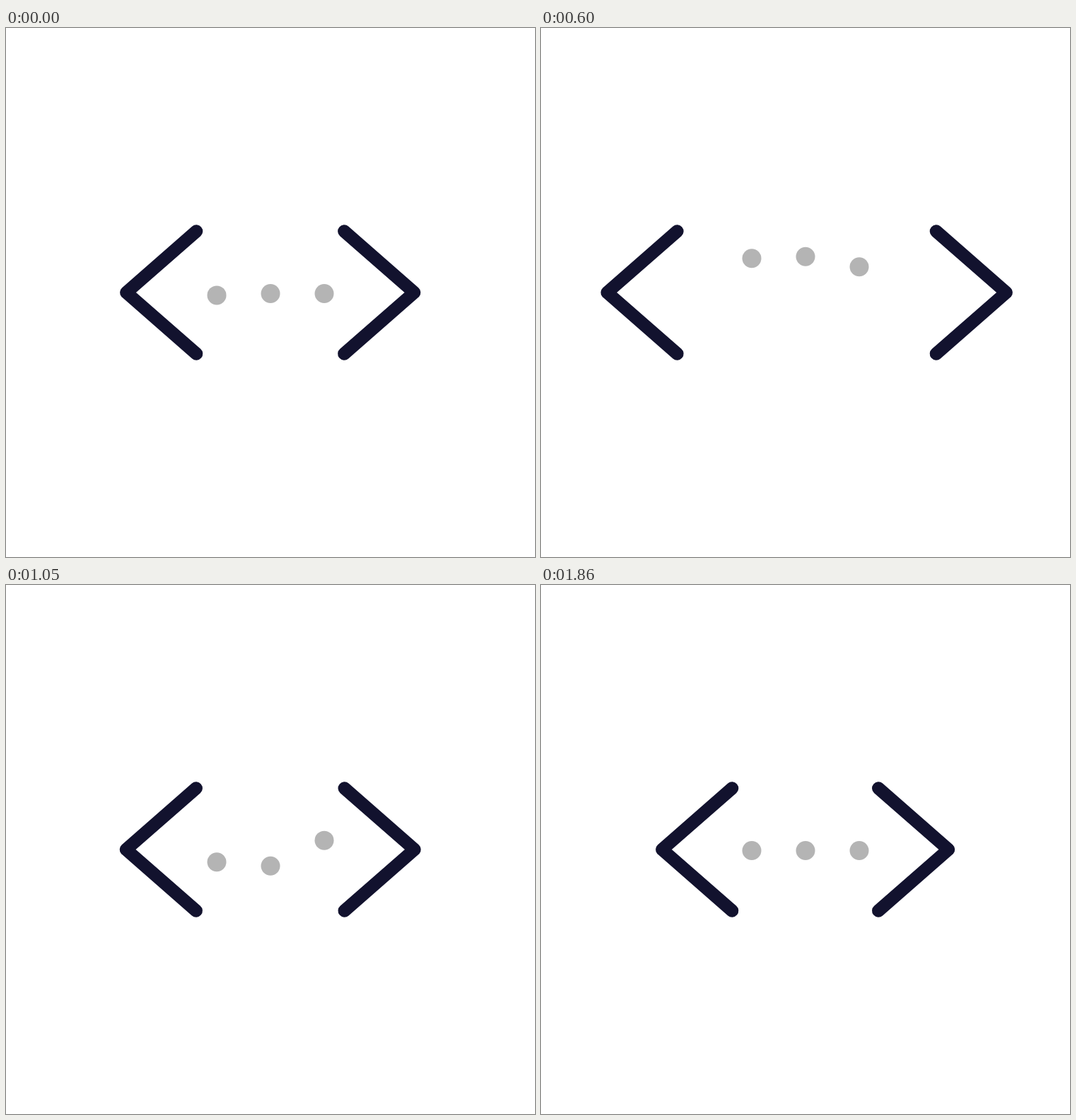
Recreate the animation shown at these times as an HTML page with a canvas. Size 748 by 748 pixels, loop 3.89 s.

```html
<!DOCTYPE html>
<html lang="en">
<head>
<meta charset="utf-8">
<title>Code brackets</title>
<style>
  html, body { margin: 0; width: 100%; height: 100%; overflow: hidden; background: #fff; }
  canvas { display: block; width: 748px; height: 748px; }
</style>
</head>
<body>
<canvas id="stage" width="748" height="748"></canvas>
<script>
const ctx = document.getElementById('stage').getContext('2d');
const LOOP = 3890, STEP = 30, MOVE_END = 1860, DELAY = 135;
const MID = 374, ARM_X = 99, ARM_Y = 86.6;

const pose = (t, v, speed = 0) => ({ t, v, speed });

// dot height: wind-up, jump, drop below rest, bounce, rest
const dotY = motion(
  pose(-35, 375.5), pose(100, 390), pose(280, 351, -0.32), pose(514, 322.6),
  pose(810, 372, 0.39), pose(945, 398.6), pose(1290, 367.9), pose(1590, 375.5)
);

// how far the brackets have spread: open, snap shut past rest, relax
const spread = motion(
  pose(-35, 0), pose(230, 47, 0.3), pose(470, 80.3),
  pose(1050, 1.4, -0.33), pose(1180, -16), pose(1520, 0)
);

// cubic Hermite motion; a pose without speed is a turning point
function motion(...poses) {
  const first = poses[0], last = poses[poses.length - 1];
  return time => {
    const t = Math.max(first.t, Math.min(last.t, time));
    const i = Math.max(1, poses.findIndex(p => p.t >= t));
    const a = poses[i - 1], b = poses[i];
    const h = b.t - a.t, u = (t - a.t) / h, w = 1 - u;
    return a.v + (b.v - a.v) * u * u * (3 - 2 * u)
      + h * u * w * (a.speed * w - b.speed * u);
  };
}

function bracket(x, dir) {
  ctx.beginPath();
  ctx.moveTo(x + dir * ARM_X, MID - ARM_Y);
  ctx.lineTo(x, MID);
  ctx.lineTo(x + dir * ARM_X, MID + ARM_Y);
  ctx.stroke();
}

function dot(x, y) {
  ctx.beginPath();
  ctx.arc(x, y, 13.5, 0, Math.PI * 2);
  ctx.fill();
}

function draw(t) {
  ctx.fillStyle = '#fff';
  ctx.fillRect(0, 0, 748, 748);

  ctx.fillStyle = '#b4b4b4';
  for (let i = 0; i < 3; i++) dot(298 + 76 * i, dotY(t - DELAY * i));

  ctx.strokeStyle = '#12122e';
  ctx.lineWidth = 18.2;
  ctx.lineCap = ctx.lineJoin = 'round';
  const d = spread(t);
  bracket(171.2 - d, 1);
  bracket(576.1 + d * 1.052, -1);
}

function tick() {
  const t = performance.now() % LOOP;
  draw(Math.min(MOVE_END, Math.floor(t / STEP) * STEP));
  requestAnimationFrame(tick);
}
tick();
</script>
</body>
</html>
```
